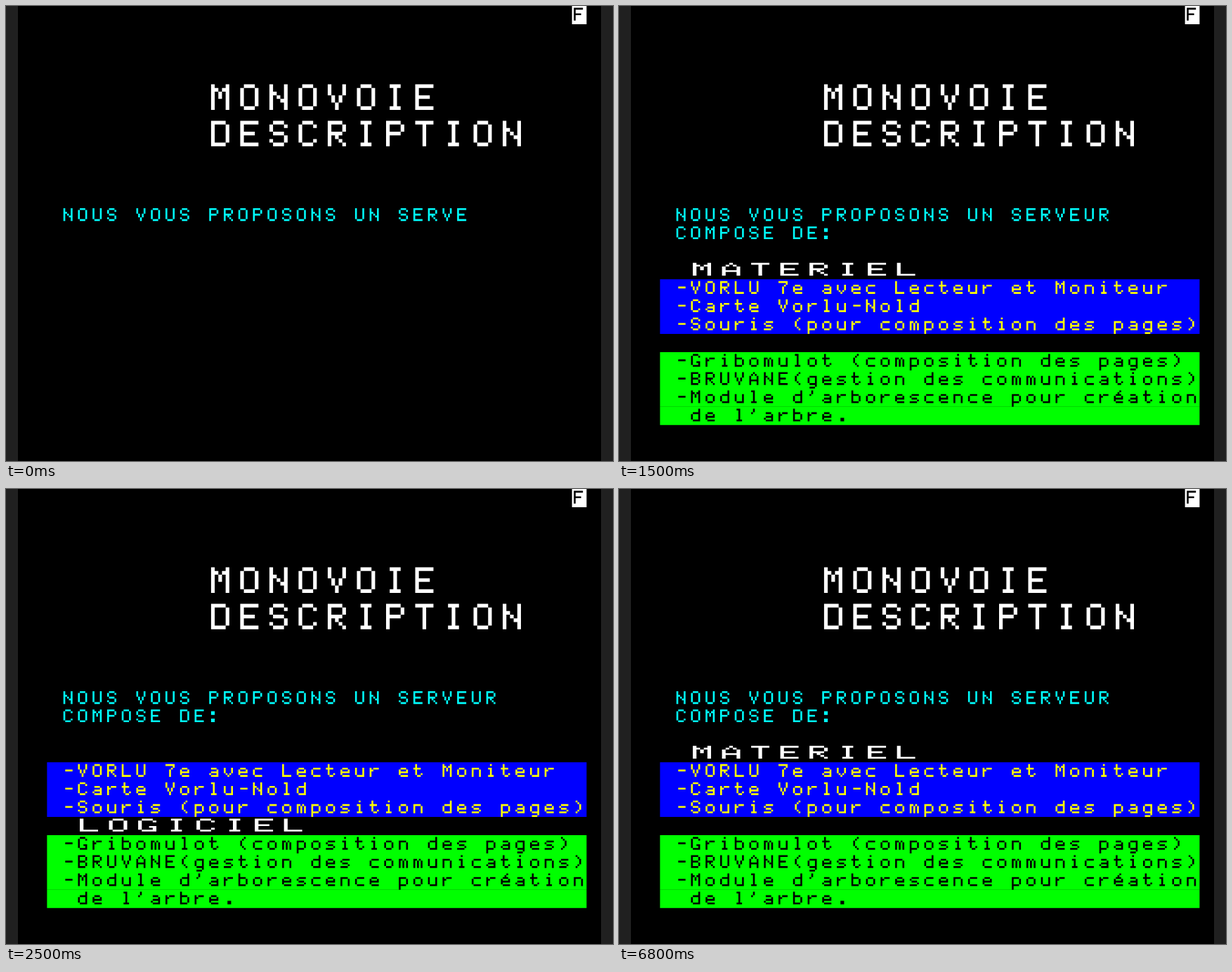
These frames come from a looping animation (864 px wide and 648 px high, 8000 ms). An HTML page with a canvas:

```html
<!DOCTYPE html>
<html lang="fr">
<head>
<meta charset="utf-8">
<title>Monovoie</title>
<style>
  html, body { margin: 0; width: 100%; height: 100%; overflow: hidden; background: #000; }
  canvas { display: block; width: 864px; height: 648px; font-family: "DejaVu Sans Mono", monospace; }
</style>
</head>
<body>
<canvas id="screen" width="864" height="648">Monovoie : description du serveur, matériel et logiciel.</canvas>
<script>
const ctx = document.getElementById('screen').getContext('2d');

// Videotex grid: 40 x 25 cells of 8 x 10 dots.
const DOT = 864 / 333, LEFT = 6.5 * DOT, CELL_W = 8 * DOT, CELL_H = 10 * DOT;
const LOOP = 8000;

// Pen strokes of each letter, capitals 5 dots wide and 7 high.
const STROKES = {
  A: 'M0 6V2L2 0L4 2V6M0 4H4',
  B: 'M3 0H0V6H3M0 3H3M4 1V2M4 4V5',
  C: 'M4 1L3 0H1L0 1V5L1 6H3L4 5',
  D: 'M0 0V6H3L4 5V1L3 0H0',
  E: 'M4 0H0V6H4M0 3H3',
  F: 'M4 0H0V6M0 3H3',
  G: 'M4 1L3 0H1L0 1V5L1 6H4V4H3',
  I: 'M1 0H3M2 0V6M1 6H3',
  L: 'M0 0V6H4',
  M: 'M0 6V0L2 2V3M2 2L4 0V6',
  N: 'M0 0V6M1 2L3 4M4 0V6',
  O: 'M1 0H3L4 1V5L3 6H1L0 5V1',
  P: 'M0 6V0H3L4 1V2L3 3H0',
  R: 'M0 6V0H3L4 1V2L3 3H0M2 4L4 6',
  S: 'M4 1L3 0H1L0 1V2L1 3H3L4 4V5L3 6H1L0 5',
  T: 'M0 0H4M2 0V6',
  U: 'M0 0V5L1 6H3L4 5V0',
  V: 'M0 0V2M1 3V4M2 5V6M3 4V3M4 2V0',
  a: 'M1 2H3L4 3V6H1L0 5L1 4H4',
  b: 'M0 0V6H3L4 5V3L3 2H0',
  c: 'M4 2H1L0 3V5L1 6H4',
  d: 'M4 0V6H1L0 5V3L1 2H4',
  e: 'M0 4H4V3L3 2H1L0 3V5L1 6H4',
  g: 'M4 6H1L0 5V3L1 2H4V7L3 8H1',
  i: 'M2 0V0M1 2H2V6M1 6H3',
  l: 'M1 0H2V6M1 6H3',
  m: 'M0 6V2H1L2 3V6M2 3L3 2L4 3V6',
  n: 'M0 6V2H3L4 3V6',
  o: 'M1 2H3L4 3V5L3 6H1L0 5V3',
  p: 'M0 8V2H3L4 3V5L3 6H0',
  r: 'M0 2V6M1 3L2 2H4',
  s: 'M4 2H1L0 3L1 4H3L4 5L3 6H0',
  t: 'M1 0V5L2 6H3L4 5M0 2H3',
  u: 'M0 2V5L1 6H4V2',
  v: 'M0 2V4L2 6L4 4V2',
  7: 'M0 0H4V1L2 3V6',
  '-': 'M1 3H4',
  '(': 'M3 0L1 2V4L3 6',
  ')': 'M1 0L3 2V4L1 6',
  '.': 'M2 5H3V6H2',
  ':': 'M1 1H2V2H1M1 5H2V6H1',
  "'": 'M2 0V1L1 2'
};
STROKES['é'] = STROKES.e + 'M2 1L3 0';

// Walk the strokes dot by dot.
function trace(path) {
  const dots = new Set();
  let x = 0, y = 0;
  for (const [, cmd, a, b] of path.matchAll(/([MLHV])(\d)(?: (\d))?/g)) {
    const tx = cmd === 'V' ? x : +a;
    const ty = cmd === 'V' ? +a : cmd === 'H' ? y : +b;
    if (cmd !== 'M') {
      const n = Math.max(Math.abs(tx - x), Math.abs(ty - y));
      for (let i = 0; i <= n; i++) {
        const k = n ? i / n : 0;
        dots.add(Math.round(x + (tx - x) * k) + 10 * Math.round(y + (ty - y) * k));
      }
    }
    x = tx;
    y = ty;
  }
  return [...dots].map(d => [d % 10, Math.floor(d / 10)]);
}

const GLYPHS = {};
for (const ch in STROKES) GLYPHS[ch] = trace(STROKES[ch]);

function bar(col, row, cols, rows, color) {
  ctx.fillStyle = color;
  ctx.fillRect(LEFT + col * CELL_W, row * CELL_H, cols * CELL_W, rows * CELL_H);
}

function write(text, col, row, color, wide = 1, tall = 1) {
  const w = DOT * wide, h = DOT * tall;
  const top = row * CELL_H + (tall > 1 ? 1.5 : 1) * h;
  ctx.fillStyle = color;
  [...text].forEach((ch, i) => {
    const left = LEFT + (col + i * wide) * CELL_W + w;
    ctx.beginPath();
    for (const [x, y] of GLYPHS[ch] || []) ctx.rect(left + x * w, top + y * h, w, h);
    ctx.fill();
  });
}

const HARDWARE = [
  '-VORLU 7e avec Lecteur et Moniteur',
  '-Carte Vorlu-Nold',
  '-Souris (pour composition des pages)'
];
const SOFTWARE = [
  '-Gribomulot (composition des pages)',
  '-BRUVANE(gestion des communications)',
  "-Module d'arborescence pour création",
  " de l'arbre."
];

// Page progress and which heading blinks on.
const STEPS = [
  { at: 0, lastRow: 0 },
  { at: 500, lastRow: 15, heading: 'LOGICIEL' },
  { at: 1000, lastRow: 37, heading: 'LOGICIEL' },
  { at: 1500, lastRow: 37, heading: 'MATERIEL' },
  { at: 2500, lastRow: 37, heading: 'LOGICIEL' },
  { at: 5000, lastRow: 37, heading: 'MATERIEL' }
];

function draw({ lastRow, heading }) {
  ctx.fillStyle = '#202020';
  ctx.fillRect(0, 0, 864, 648);
  ctx.fillStyle = '#000';
  ctx.fillRect(17, 0, 830, 648);

  bar(38, 0, 1, 1, '#fff');
  write('F', 38, 0, '#000');
  write('MONOVOIE', 13, 4, '#fff', 2, 2);
  write('DESCRIPTION', 13, 6, '#fff', 2, 2);
  write(lastRow ? 'NOUS VOUS PROPOSONS UN SERVEUR' : 'NOUS VOUS PROPOSONS UN SERVE', 3, 11, '#0ff');
  if (!lastRow) return;

  write('COMPOSE DE:', 3, 12, '#0ff');
  bar(2, 15, 37, 3, '#00f');
  HARDWARE.forEach((line, i) => write(line, 3, 15 + i, '#ff0'));
  bar(2, 19, 37, 3, '#0f0');
  bar(2, 22, lastRow, 1, '#0f0');
  SOFTWARE.forEach((line, i) => write(line, 3, 19 + i, '#000'));
  write(heading, 4, heading === 'MATERIEL' ? 14 : 18, '#fff', 2);
}

let shown;
function tick() {
  const t = performance.now() % LOOP;
  const step = STEPS.findLast(s => s.at <= t);
  if (step !== shown) draw(shown = step);
  requestAnimationFrame(tick);
}
tick();
</script>
</body>
</html>
```
